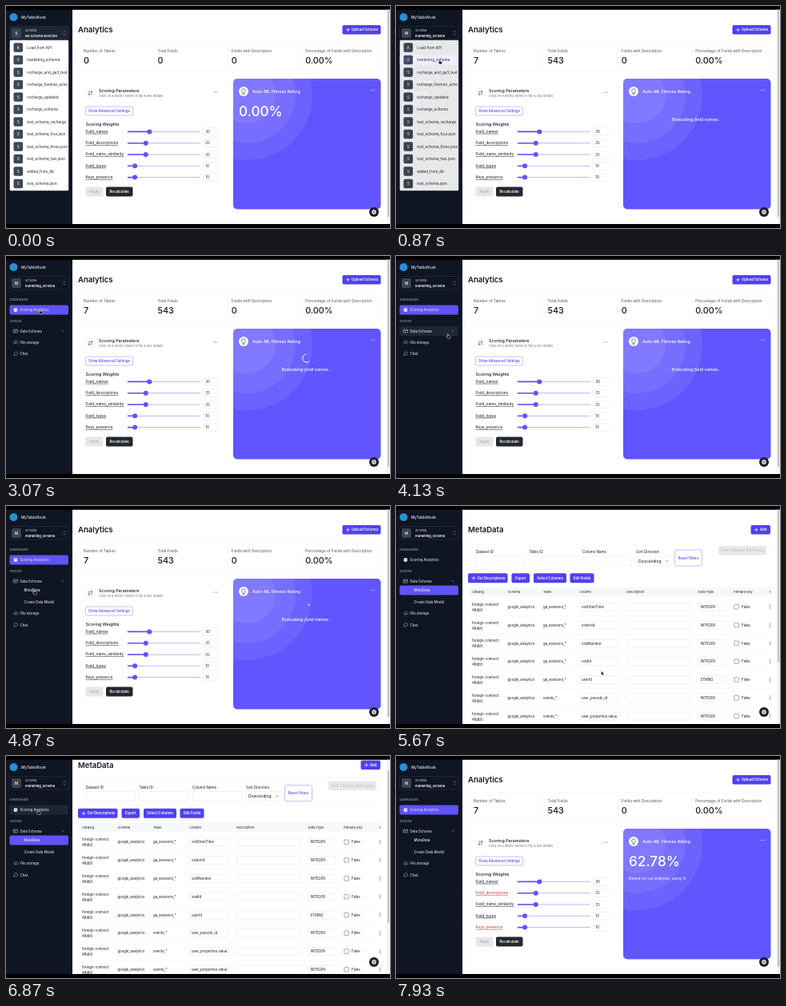
An HTML page that plays this animation: 480 by 278 pixels, repeating every 8000 ms.

```html
<!DOCTYPE html>
<html lang="en">
<head>
<meta charset="utf-8">
<title>Schema analytics</title>
<style>
  html, body { margin: 0; width: 100%; height: 100%; overflow: hidden; background: #000; }
  svg { display: block; width: 100%; height: 100%; font-family: Inter, sans-serif; }
  text { white-space: pre; }
  .gear { transform-origin: 460px 258px; animation: spin 2s linear infinite; }
  .bad { fill: #d32f2f; }
  @keyframes spin { to { transform: rotate(360deg); } }
</style>
</head>
<body>
<svg id="stage" viewBox="0 0 480 278"></svg>
<script>
const LOOP = 8000;
const PURPLE = '#5f54f8', DEEP = '#5140ee', INK = '#12161f', LINE = '#e3e5ea', NIGHT = '#0f1522';

// Markup helpers
const text = (x, y, str, size = 4.33, fill = INK, weight = 400, extra = '') =>
  `<text x="${x}" y="${y}" font-size="${size}" fill="${fill}" font-weight="${weight}" ${extra}>${str}</text>`;
const mid = (x, y, str, size, fill, weight, extra = '') =>
  text(x, y, str, size, fill, weight, `text-anchor="middle" ${extra}`);
const rect = (x, y, w, h, fill, r = 0, stroke = 'none', extra = '') =>
  `<rect x="${x}" y="${y}" width="${w}" height="${h}" rx="${r}" fill="${fill}" stroke="${stroke}" stroke-width=".5" ${extra}/>`;
const circle = (x, y, r, fill, extra = '') => `<circle cx="${x}" cy="${y}" r="${r}" fill="${fill}" ${extra}/>`;
const path = (d, stroke, width = .6, extra = '') =>
  `<path d="${d}" fill="none" stroke="${stroke}" stroke-width="${width}" stroke-linecap="round" stroke-linejoin="round" ${extra}/>`;
const group = (id, body, extra = '') => `<g id="${id}" ${extra}>${body}</g>`;
const dots = (x, y, fill) => [-2, 0, 2].map(d => circle(x + d, y, .5, fill)).join('');
const field = (x, y, w, h, str = '') => rect(x, y, w, h, '#fff', 1.8, LINE) + text(x + 3, y + h / 2 + 1.6, str, 4.33);
const button = (x, y, w, h, str, fill = DEEP, color = '#fff') =>
  rect(x, y, w, h, fill, 2) + mid(x + w / 2, y + h / 2 + 1.55, str, 4.33, color, 600);
const plusButton = (x, y, w, h, str) => rect(x, y, w, h, DEEP, 2) +
  path(`M${x + 5} ${y + h / 2}h4m-2 -2v4`, '#fff', .7) + text(x + 11.5, y + h / 2 + 1.55, str, 4.33, '#fff', 600);

// Sidebar
const icons = {
  chart: y => circle(12, y, 2.4, '#fff') + path(`M12 ${y}v-2.4M12 ${y}h2.4`, PURPLE, .6),
  table: y => path(`M9.5 ${y - 2}h5v4h-5zM9.5 ${y - .6}h5M11.3 ${y - .6}v2.6`, '#b6bcc8', .5),
  cloud: y => path(`M10.6 ${y + 1.6}a1.5 1.5 0 0 1 0-2.8a2 2 0 0 1 3.6.4a1.3 1.3 0 0 1 0 2.4M12.2 ${y + 2}v-2m-.8.8l.8-.8l.8.8`, '#b6bcc8', .5),
  chat: y => path(`M10 ${y + 2}l.4-1.2a2.2 2.2 0 1 1 1 1z`, '#b6bcc8', .5)
};
const navItem = (icon, y, str) => icons[icon](y) + text(17.5, y + 1.6, str, 4.3, '#d5d9e1', 500);
const bar = (id, y, fill) => rect(4.5, y - 6, 73.5, 12, fill, 2, 'none', `id="${id}"`);

const sidebar = rect(0, 4.5, 83, 268.5, NIGHT) +
  circle(9.5, 14, 5, '#2590d6') + text(19, 15.8, 'MyTableNook', 4.7, '#e8ebf0', 500) +
  rect(4.5, 25.5, 73.5, 16.5, NIGHT, 2, '#2c3445', 'id="picker"') +
  rect(7, 28, 12, 12, '#3b4353', 2) + mid(13, 35.6, 'S', 4.5, '#fff', 500, 'id="initial"') +
  text(24, 32.3, 'Schema', 3.7, '#d5d9e1') + text(24, 38.8, '', 4.05, '#fff', 600, 'id="schemaName"') +
  path('M72 32.6l1.2-1.2l1.2 1.2M72 35l1.2 1.2l1.2-1.2', '#a4abb8', .5) +
  text(4.5, 56, 'Dashboards', 4.1, '#a4abb8') +
  bar('scoreHover', 67.5, '#1e2635') + bar('scoreActive', 67.5, PURPLE) + navItem('chart', 67.5, 'Scoring Analytics') +
  text(4.5, 82.8, 'General', 4.1, '#a4abb8') +
  bar('schemaHover', 94, '#1e2635') + navItem('table', 94, 'Data Schema') +
  path('M70.5 92.8l1.2 1.2l-1.2 1.2', '#a4abb8', .5, 'id="chevron"') +
  group('submenu', bar('metaActive', 105.5, PURPLE) + text(22.5, 107.1, 'MetaData', 4.3, '#e8ebf0', 500) +
    text(22.5, 121.6, 'Create Data Model', 4.25, '#d5d9e1', 500)) +
  group('lowerNav', navItem('cloud', 108, 'File storage') + navItem('chat', 122.4, 'Chat'));

const schemas = ['Load from API', 'marketing_schema', 'recharge_and_ga3_test', 'recharge_fivetran_sche',
  'recharge_updated', 'recharge_schema', 'test_schema_recharge', 'test_schema_four.json',
  'test_schema_three.json', 'test_schema_two.json', 'added_from_db', 'test_schema.json'];
const dropdown = group('dropdown', rect(4.5, 42.5, 74.5, 189, '#fff', 2) + schemas.map((name, i) => {
  const y = 52 + 15.5 * i;
  return rect(9.5, y - 5.8, 11.6, 11.6, '#3f4757', 2) + mid(15.3, y + 1.5, i ? 'S' : 'A', 4.2, '#fff', 500) +
    text(26.3, y + 1.6, name, 4.6, '#20252f');
}).join(''), 'clip-path="url(#menuClip)"');

// Analytics page
const stats = ['Number of Tables', 'Total Fields', 'Fields with Description', 'Percentage of Fields with Description'];
const statCard = rect(90.5, 46, 378.5, 36, '#fff', 5, '#f0f1f4') + stats.map((label, i) => {
  const x = 97 + 92.4 * i;
  return text(x, 57.8, label, 4.72, '#4b5361') + text(x, 72.2, i === 3 ? '0.00%' : '0', 10.8, INK, 500, `id="stat${i}"`) +
    (i ? path(`M${x - 4.5} 53v23`, '#dfe2e8', .4, 'stroke-dasharray="1 1"') : '');
}).join('');

const weights = [['Field_names', 30], ['Field_descriptions', 25], ['Field_name_similarity', 25], ['Field_types', 10], ['Keys_presence', 10]];
const sliders = weights.map(([name, value], i) => {
  const y = 157.4 + 14.3 * i, knob = 152 + .91 * value;
  return text(99.5, y + 1.4, name, 4.75, INK, 400, `class="metric" text-decoration="underline"`) +
    path(`M152.5 ${y}H242.5`, '#bdb8fb', 1) + path(`M152.5 ${y}H${knob}`, PURPLE, 1.6) + circle(knob, y, 3, PURPLE) +
    rect(246.5, y - 4.8, 18.5, 9.6, '#fff', 1.8, LINE) + text(249.6, y + 1.5, value, 4.2);
}).join('');

const scoring = rect(91, 92, 185, 152, '#fff', 5, '#f8f8fa') +
  circle(105.5, 109, 6, '#fff', 'stroke="#e9eaef" stroke-width=".6"') +
  path('M104 106.4v5m-1.2-1.2l1.2 1.2l1.2-1.2M107 111.4v-5m-1.2 1.2l1.2-1.2l1.2 1.2', '#333a47', .6) +
  text(116, 108.4, 'Scoring Parameters', 5.35, INK, 500) +
  text(116, 114.4, 'Click on a metric name to flip &amp; see details', 4, '#6b7280') + dots(262, 108, '#4b5361') +
  rect(99.5, 126, 59, 11, '#fff', 2, '#8d85fa') + mid(129, 133.1, 'Show Advanced Settings', 4.33, DEEP, 500) +
  text(99.5, 150, 'Scoring Weights', 5.35, INK, 500) + sliders +
  button(99.5, 226.5, 22, 12, 'Apply', '#e6e7ea', '#b3b7be') + button(125, 226.5, 33.5, 12, 'Recalculate', '#23272e');

const scoreCard = rect(284, 91, 184.5, 163.5, '#6055ff', 5) +
  `<g clip-path="url(#cardClip)">${[82, 61, 36].map(r => circle(301, 111, r, '#fff', 'opacity=".075"')).join('')}</g>` +
  circle(297, 107, 6, '#fff') + path('M296 109.2c0-1-1.4-1.5-1.4-3.1a2.4 2.4 0 0 1 4.8 0c0 1.6-1.4 2.1-1.4 3.1zM296.2 110.6h1.6', '#333a47', .6) +
  text(308, 109, 'Auto-ML Fitness Rating', 5.35, '#fff', 500) + dots(458.5, 105.3, '#fff') +
  group('result', text(291, 138, '', 17.2, '#fff', 500, 'id="score"') + text(291, 154.6, '', 4.9, '#fff', 400, 'id="summary"')) +
  group('waiting', mid(376, 144, 'Evaluating field names...', 5.35, '#fff', 500, 'font-style="italic"') +
    path('', '#fff', 1, 'id="spinner" style="stroke-linecap:butt"'));

const analytics = group('analytics', text(90, 33, 'Analytics', 9.6, INK, 600) +
  plusButton(420.5, 24, 48, 11.5, 'Upload Schema') + statCard + scoring + scoreCard);

// Metadata page
const filters = [['Dataset ID', 100, 61], ['Table ID', 166.5, 61.5], ['Column Name', 233, 61.5], ['Sort Direction', 300, 44]];
const columns = [['Catalog', 95], ['Schema', 139.5], ['Table', 184], ['Column', 229], ['Description', 288], ['Data Type', 377.5], ['Primary Key', 422], ['Foreign Key', 467]];
const fields = ['visitStartTime', 'visitorId', 'visitNumber', 'visitId', 'userId', 'user_pseudo_id', 'user_properties.value.c', 'user_properties.value.c'];
const tableRow = (name, i) => {
  const y = 126.3 + 22.8 * i;
  return text(95, y - 1.6, 'foreign-connect', 4.4) + text(95, y + 5.4, '48db5', 4.4) +
    text(139.5, y + 1.6, 'google_analytics', 4.25) + text(184, y + 1.6, i < 5 ? 'ga_sessions_*' : 'events_*') +
    rect(229, y - 5, 50, 10, '#fff', 1.8, LINE) + `<g clip-path="url(#columnClip)">${text(232, y + 1.6, name)}</g>` +
    field(288.5, y - 5, 79.5, 10) + field(377.5, y - 5, 34.5, 10, i === 4 ? 'STRING' : 'INTEGER') +
    rect(422.8, y - 2.8, 5.6, 5.6, '#fff', 1, '#4b5361') + text(432, y + 1.6, 'False') +
    rect(467.5, y - 2.8, 5.6, 5.6, '#fff', 1, '#4b5361') + path(`M90.5 ${y + 11.4}H468.5`, '#eceef2', .4);
};
const metadata = group('metadata', text(90, 33, 'MetaData', 9.5, INK, 600) + plusButton(443.5, 24, 24.5, 11.5, 'Add') +
  rect(90.5, 46, 378, 34, '#fff', 4, '#f4f5f7') +
  filters.map(([label, x, w]) => text(x, 59, label, 4.5) + rect(x, 63, w, 12, '#fff', 2, LINE)).join('') +
  text(303, 70.8, 'Descending', 5.1) + path('M337.6 68.3l1.4 1.4l1.4-1.4', '#4b5361') +
  rect(348.5, 55, 34, 20, '#fff', 2, '#8d85fa') + mid(365.5, 66.5, 'Reset Filters', 4.33, DEEP, 500) +
  button(403, 50, 60, 11.5, 'Save Changes (All Pages)', '#e8e9ec', '#c3c6cc') +
  plusButton(90, 84.3, 49.5, 12, 'Get Descriptions') + button(144.5, 84.3, 22.5, 12, 'Export') +
  button(172, 84.3, 41, 12, 'Select Columns') + button(217.5, 84.3, 30, 12, 'Edit Fields') +
  `<g clip-path="url(#tableClip)">${rect(90.5, 102, 380, 11.5, '#f7f8fa')}${columns.map(([label, x]) =>
    text(x, 109.4, label, 4.1, '#3a4250', 500)).join('')}${fields.map(tableRow).join('')}</g>`);

const clip = (id, x, y, w, h, r = 0) => `<clipPath id="${id}">${rect(x, y, w, h, '#000', r)}</clipPath>`;
const teeth = Array.from({ length: 8 }, (_, i) =>
  rect(459.4, 254.8, 1.2, 1.6, '#fff', .2, 'none', `transform="rotate(${45 * i} 460 258)"`)).join('');

document.getElementById('stage').innerHTML = `<defs>
  ${clip('view', 0, 4.5, 480, 268.5)}${clip('menuClip', 4.5, 42.5, 73.7, 189)}${clip('cardClip', 284, 91, 184.5, 163.5, 5)}
  ${clip('columnClip', 229, 0, 48.5, 400)}${clip('tableClip', 90, 100, 378.5, 220)}</defs>
  ${rect(0, 0, 480, 278, '#000')}
  <g clip-path="url(#view)">${rect(83, 4.5, 397, 268.5, '#fff')}${analytics}${metadata}
    ${rect(476, 4.5, 4, 268.5, '#f5f5f6')}${rect(476.9, 5, 2.2, 259, '#bfc1c5', 1.1, 'none', 'id="thumb"')}
    ${sidebar}${dropdown}
    ${circle(460, 258, 6, '#141a27')}
    <g class="gear">${teeth}${circle(460, 258, 2.3, '#fff')}${circle(460, 258, 1, '#141a27')}</g>
    <g id="cursor" stroke="#fff" stroke-width=".5" stroke-linejoin="round">
      <path id="arrow" fill="#000" d="M0 0v5.4l1.3-1.2l.9 2l.9-.4l-.9-1.9h1.7z"/>
      <path id="hand" fill="#000" d="M-.2 .3q.6-.7 1 0v2l2.3.5q.6.2.5.8l-.4 2.2h-2.8l-1.8-2.4q0-.8.9-.3l.3.3z"/>
    </g>
  </g>`;

// Timeline
const $ = Object.fromEntries([...document.querySelectorAll('#stage [id]')].map(el => [el.id, el]));
const metrics = document.querySelectorAll('.metric');
const SELECT = 800, EXPAND = 4480, META = 4900, LEAVE = 6930, RETURN = 7070, SCORED = 7500, TYPE = 7630;
const SUMMARY = 'Based on our analysis, using G';
const route = [[70, 58, 36], [480, 54, 67], [1000, 54, 67], [1750, 204, 223.5], [2050, 204, 223.5], [2600, 40, 20],
  [3050, 42, 67], [3470, 60, 34], [3950, 64.5, 97.5], [4500, 64.5, 97.5], [4780, 35, 105], [5270, 32, 106],
  [5620, 256.5, 206.5], [6100, 256.5, 206.5], [6700, 39.5, 67.5], [7070, 39.5, 67.5]];

const show = (el, on) => el.setAttribute('visibility', on ? 'visible' : 'hidden');
const between = (t, a, b) => t >= a && t < b;
const clamp = v => Math.min(1, Math.max(0, v));
const ease = v => { v = clamp(v); return v * v * (3 - 2 * v); };

function cursorAt(t) {
  const i = route.findIndex(stop => stop[0] > t);
  if (i < 1) return null;
  const [t0, x0, y0] = route[i - 1], [t1, x1, y1] = route[i], k = ease((t - t0) / (t1 - t0));
  return [x0 + (x1 - x0) * k, y0 + (y1 - y0) * k];
}

// Arc that grows, then shrinks from its tail while the whole ring turns
function spinnerPath(t) {
  const phase = (((t - 848) / 822) % 1 + 1) % 1, grow = ease(phase * 2), shrink = ease(phase * 2 - 1);
  const tail = 43 * grow + 315 * shrink;
  const head = Math.min(360, tail + 3 + 284 * grow);
  const point = deg => {
    const a = (deg + 360 * phase) * Math.PI / 180;
    return `${376 + 5.2 * Math.cos(a)} ${128 + 5.2 * Math.sin(a)}`;
  };
  return `M${point(tail)}A5.2 5.2 0 ${head - tail > 180 ? 1 : 0} 1 ${point(head)}`;
}

function render(t) {
  const chosen = t >= SELECT, onMeta = between(t, META, LEAVE), onAnalytics = t < META || t >= RETURN;
  const scored = t >= SCORED, waiting = onAnalytics && chosen && !scored;
  const pos = cursorAt(t), [cx, cy] = pos || [0, 0];
  const over = (y, h = 6) => pos && between(cx, 4, 78) && Math.abs(cy - y) < h;

  show($.analytics, onAnalytics);
  show($.metadata, onMeta);
  show($.result, onAnalytics && !waiting);
  show($.waiting, waiting);
  $.stat0.textContent = chosen ? '7' : '0';
  $.stat1.textContent = chosen ? '543' : '0';
  $.score.textContent = scored ? '62.78%' : '0.00%';
  $.summary.textContent = SUMMARY.slice(0, Math.max(0, Math.floor((t - TYPE) / 10)));
  metrics.forEach((el, i) => el.classList.toggle('bad', scored && (i === 1 || i === 4)));
  $.spinner.setAttribute('d', spinnerPath(t));

  $.dropdown.setAttribute('opacity', 1 - clamp((t - 850) / 200));
  $.initial.textContent = chosen ? 'M' : 'S';
  $.schemaName.textContent = chosen ? 'marketing_schema' : 'No schema selected';
  $.picker.setAttribute('fill', t < 300 || over(34, 8) ? '#1e2635' : NIGHT);

  const open = ease((t - EXPAND) / 140);
  show($.submenu, open > .6);
  show($.metaActive, onMeta);
  show($.scoreActive, !onMeta);
  show($.scoreHover, onMeta && over(67.5));
  show($.schemaHover, t > 1050 && over(94));
  $.lowerNav.setAttribute('transform', `translate(0 ${26.5 * open})`);
  $.chevron.setAttribute('transform', `rotate(${90 * open} 71.1 94)`);

  const scroll = onMeta ? 18.5 * ease((t - 5800) / 250) : 0;
  $.metadata.setAttribute('transform', `translate(0 ${-scroll})`);
  $.thumb.setAttribute('y', 5 + scroll * .71);
  $.thumb.setAttribute('height', onMeta ? 191 : 259);

  show($.cursor, pos);
  $.cursor.setAttribute('transform', `translate(${cx} ${cy})`);
  show($.hand, pos && cx < 78);
  show($.arrow, pos && cx >= 78);
}

let start;
function tick(now) {
  start ??= now;
  render((now - start) % LOOP);
  requestAnimationFrame(tick);
}
render(0);
requestAnimationFrame(tick);
</script>
</body>
</html>
```
